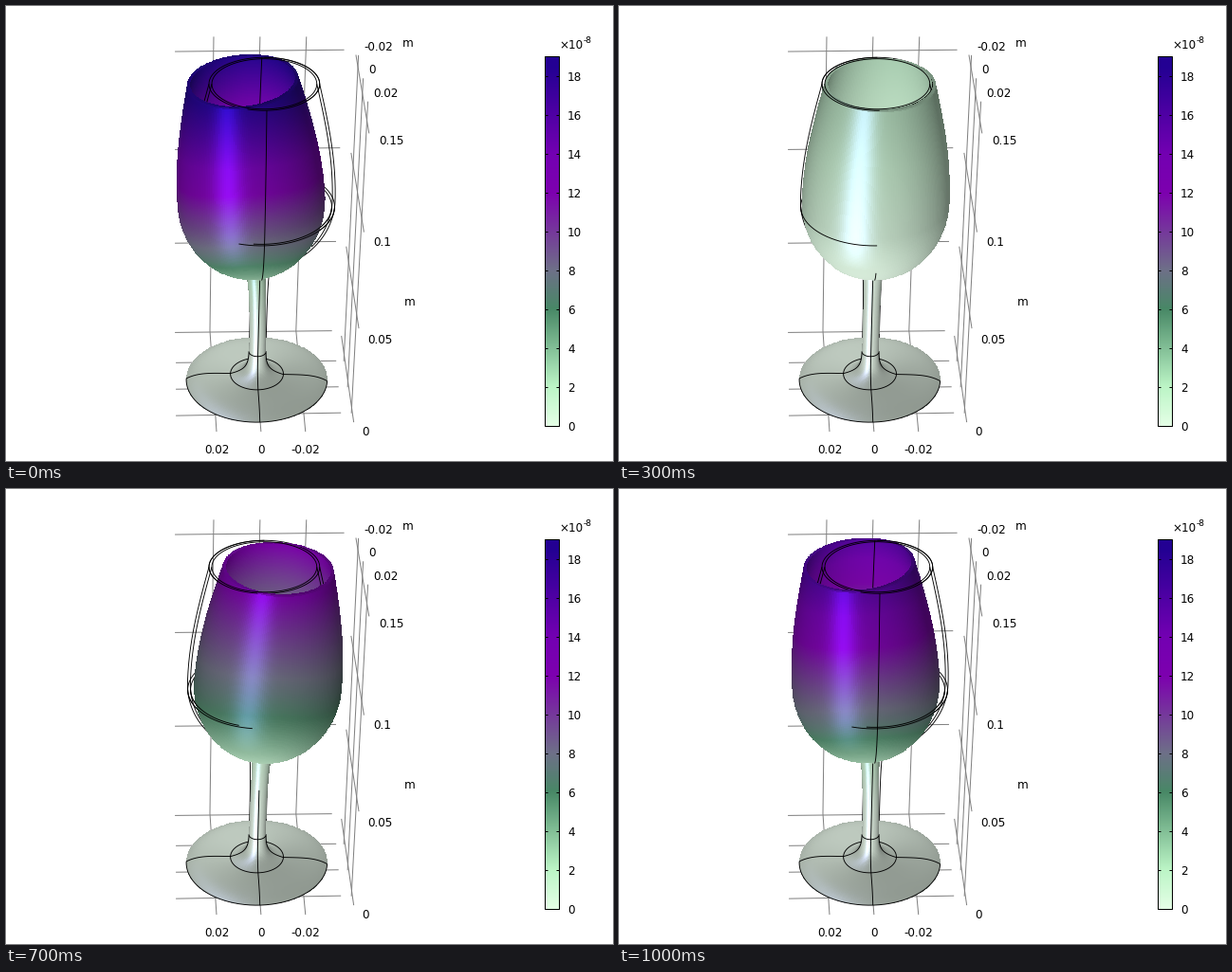
A matplotlib script that plays this animation: 640x480 px, repeating every 1.1 s.

```python
import numpy as np
import matplotlib.pyplot as plt
from matplotlib.animation import FuncAnimation
from matplotlib.patches import Rectangle

W, H, DPI = 640, 480, 100
FRAMES = 11
PX = 72 / DPI
# ring-centre heights on screen, from the lip down to the foot
RIM, WIDE, SEAM, BOTTOM, CLAMP, PLATE = 82, 205, 212, 278, 365, 388.8
WALL = 3
TURN = 0.045          # the front meridian is turned slightly to the right
SIDE = np.pi / 2

STOPS = [0, 2, 6, 8, 12, 14, 18.5]
COLORS = np.array([(228, 255, 230), (188, 245, 198), (72, 136, 102), (110, 112, 136),
                   (125, 0, 175), (115, 0, 178), (35, 0, 147)])


def colormap(v):
    return np.stack([np.interp(v, STOPS, channel) for channel in COLORS.T], -1)


# ---------- geometry ----------
def axis_x(y):
    return 272.5 - 8 * (y - RIM) / 313


def tilt_ratio(y):
    return 0.48 + 0.124 * (y - RIM) / 313


def bowl_radius(y):
    upper = 58.5 + 19.5 * np.sin(SIDE * np.clip((y - RIM) / (WIDE - RIM), 0, 1))
    lower = 78 * np.sqrt(np.clip(1 - ((y - WIDE) / 73) ** 2, 0, 1))
    return np.where(y < WIDE, upper, lower)


def stem_radius(y):
    return 8.8 + 19.2 * np.exp((y - PLATE) / 5) + 2 * np.exp((BOTTOM - y) / 15)


PLATE_R = np.linspace(74.5, 28, 40)
PLATE_Y = PLATE + 6.2 * ((PLATE_R - 28) / 46.5) ** 4
STEM_Y = PLATE - (PLATE - BOTTOM) * np.linspace(0, 1, 70) ** 2
FOOT_Y = np.r_[PLATE_Y, STEM_Y[1:]]
FOOT_R = np.r_[PLATE_R, stem_radius(STEM_Y[1:])]
BOWL_Y = np.r_[WIDE + 73 * np.sin(np.linspace(1.42, 0, 60)), np.linspace(WIDE, RIM, 90)[1:]]
OUT_Y = np.r_[FOOT_Y, BOWL_Y, RIM]
OUT_R = np.r_[FOOT_R, bowl_radius(BOWL_Y), 58.5 - WALL]
IN_Y = np.linspace(RIM, 225, 90)
IN_R = bowl_radius(IN_Y) - WALL
THETA = np.linspace(-np.pi, np.pi, 221)


def place(y, r, theta):
    return axis_x(y) + r * np.sin(theta), y + r * tilt_ratio(y) * np.cos(theta)


def sway(y):
    """Displacement in 1e-8 m and its slope: a stiff bowl on a bending stem."""
    u = np.clip((CLAMP - y) / (CLAMP - BOTTOM), 0, 1)
    bowl = y < BOTTOM
    return np.where(bowl, 18.5 - 0.08 * (y - RIM), 2.86 * u ** 2), np.where(bowl, 0.08, 0.066 * u)


def shade(rgb, y, r, gloss):
    dr, dz = np.gradient(r), -np.gradient(y) / 0.85
    size = np.hypot(dr, dz) + 1e-9
    nr, nz = (dz / size)[:, None], (-dr / size)[:, None]
    nx, ny = nr * np.sin(THETA), nr * np.cos(THETA)
    flat = np.clip(nz, 0, 1) ** 2
    light = 0.48 + 0.4 * np.clip(0.96 * ny - 0.28 * nx, 0, 1) + 0.25 * np.clip(-nz, 0, 1)
    light = light * (1 - flat) + flat * (0.7 - 0.08 * np.cos(THETA) - 0.05 * np.sin(THETA))
    streak = gloss * np.exp(-((nx + 0.28) / 0.2) ** 2) * np.clip(ny, 0, 1)
    streak = (streak * np.clip(1 + 2 * nz, 0, 1))[..., None]
    # pale tones turn greyer under the lamps
    grey = 0.5 * rgb.min(-1, keepdims=True) / 255
    rgb = rgb + grey * (rgb.mean(-1, keepdims=True) - rgb)
    return rgb * (light[..., None] + 0.22 * streak) + 5 + streak * np.array([10, 8, 50])


def surface(y, r, c, z, gloss):
    yy, rr = y[:, None], r[:, None]
    x, sy = place(yy, rr, THETA)
    off = rr * np.sin(THETA)
    v, slope = sway(yy)
    x = x + c * 1.24 * v
    sy = sy + c * (0.16 * v + 0.9 * slope * off)
    rgb = shade(colormap(abs(c) * np.hypot(v, 0.85 * slope * off)), y, r, gloss)
    rgb = (rgb[:-1, :-1] + rgb[1:, 1:]) / 2

    # keep only quads that face the viewer
    ux, uy = x[1:, 1:] - x[:-1, :-1], sy[1:, 1:] - sy[:-1, :-1]
    wx, wy = x[:-1, 1:] - x[1:, :-1], sy[:-1, 1:] - sy[1:, :-1]
    rgba = np.dstack([np.clip(rgb / 255, 0, 1), ux * wy > uy * wx])
    return ax.pcolormesh(x, sy, rgba, shading="flat", antialiased=False, zorder=z)


# ---------- drawing helpers ----------
fig = plt.figure(figsize=(W / DPI, H / DPI), dpi=DPI, facecolor="white")
ax = fig.add_axes([0, 0, 1, 1])
ax.axis("off")


def line(x, y, z, color="black", w=0.9):
    return ax.plot(x, y, color=color, lw=w * PX, zorder=z, solid_capstyle="butt")[0]


def ring(y, r, z, a=-np.pi, b=np.pi):
    return line(*place(y, r, np.linspace(a, b, 160)), z)


def meridian(theta, y, r, z, keep=slice(None)):
    return line(*place(y[keep], r[keep], theta), z)


def text(x, y, s, size=12, ha="left"):
    ax.text(x, y, s, fontsize=size * PX, family="DejaVu Sans", ha=ha,
            va="center_baseline", zorder=9)


def grid(*points):
    line(*zip(*points), 1, "#808080", 1)


# ---------- fixed scene ----------
def draw_axes():
    for k in range(4):                       # heights 0 to 0.15
        y = 345 - 92.2 * k - 2.3 * k * k
        grid((178, y), (344 + 4.3 * k, y - 1.8))
        grid((354 + 5.1 * k, y + 3.5), (367 + 5.4 * k, 440 - 98 * k - 1.3 * k * k))
        text(376 + 5.8 * k, 449 - 95.4 * k - 2.4 * k * k, f"{0.05 * k:g}")
    for j in (-1, 0, 1):                     # the two horizontal axes
        grid((179, 405 + 28 * j), (351 + 2.5 * j, 402.5 + 27.5 * j))
        grid((377 + 5 * j, 76 + 24.5 * j), (360.5 + 4 * j, 403 + 27.5 * j))
        grid((268 + 49 * j, 32), (260.5 + 45.5 * j, 343), (269 + 47 * j, 450))
        text(383 + 5 * j, 66 + 24.5 * j, f"{0.02 * j:g}")
        text(269 + 47 * j, 468, f"{-0.02 * j:g}" if j else "0", ha="center")
    text(418, 38, "m")
    text(420.5, 311, "m")


def draw_colorbar(x0=569, x1=584, top=53, bottom=444, vmax=19):
    ramp = colormap(np.linspace(vmax, 0, bottom - top))[:, None] / 255
    ax.imshow(ramp, extent=(x0, x1, bottom, top), aspect="auto", zorder=2)
    ax.add_patch(Rectangle((x0, top), x1 - x0, bottom - top, fill=False, lw=PX, zorder=4))
    for v in range(0, vmax, 2):
        y = bottom - v * (bottom - top) / vmax
        for x in (x0, x1 - 3):
            line([x, x + 3], [y, y], 4, w=1)
        text(x1 + 9, y, str(v))
    text(x1, top - 13, "×10")
    text(x1 + 25.5, top - 17.5, "-8", 9)


def draw_foot_lines():
    ring(395, 74.5, 6, -SIDE - 0.03, SIDE - 0.03)
    ring(PLATE, 28, 6, -2.8, 2.8)
    ring(CLAMP, 9.2, 6, -SIDE, SIDE)
    for theta in (-SIDE - 0.03, TURN, SIDE - 0.03):
        meridian(theta, FOOT_Y, FOOT_R, 6, FOOT_Y > CLAMP)


# ---------- edges of the undeformed glass ----------
def wires(c):
    bowl_r = bowl_radius(BOWL_Y)
    stem = (FOOT_Y < 367) & (FOOT_Y > 279)
    lean = abs(c) > 0.5

    # behind the moving wall, seen where it has moved away
    for theta in (-SIDE, SIDE):
        yield meridian(theta, BOWL_Y, bowl_r, 4)
        yield meridian(theta, BOWL_Y, bowl_r - WALL, 4, BOWL_Y < 255)
        yield meridian(theta, FOOT_Y, FOOT_R, 4, stem)
    for inset in (0, WALL):
        yield ring(SEAM, 77.6 - inset, 4)
    yield ring(RIM, 58.5, 4)

    # in front of the moving wall, on the trailing side
    a, b = (-0.31, SIDE) if c < 0 else (-SIDE, -0.12 if lean else 0.04)
    yield ring(SEAM, 77.6, 6, a, b)
    if lean:
        yield ring(SEAM, 77.6 - WALL, 6, a + 0.2 * (c < 0), b - 0.2 * (c > 0))
    yield ring(RIM, 58.5, 6, *((a, np.pi) if c < 0 else (-np.pi, b)))
    yield ring(RIM, 58.5 - WALL, 6)
    start = 312 if c > 0 and lean else 284
    yield meridian(TURN, FOOT_Y, FOOT_R, 6, stem & (FOOT_Y > start))
    if c < 0:
        yield meridian(TURN, BOWL_Y, bowl_r, 6, BOWL_Y < 268)
        yield meridian(np.pi + TURN, BOWL_Y, bowl_r, 4, BOWL_Y < 150)
    elif not lean:
        yield meridian(TURN, BOWL_Y, bowl_r, 6, (BOWL_Y > 247) & (BOWL_Y < 268))


draw_axes()
draw_colorbar()
draw_foot_lines()
ax.set_xlim(-0.5, W + 1)
ax.set_ylim(H + 1, -0.5)
moving = []


def update(i):
    while moving:
        moving.pop().remove()
    c = -np.cos(2 * np.pi * i / FRAMES)
    moving.append(surface(IN_Y, IN_R, c, 3, 0))
    moving.append(surface(OUT_Y, OUT_R, c, 5, 1))
    moving.extend(wires(c))
    return moving


anim = FuncAnimation(fig, update, frames=FRAMES, init_func=lambda: [],
                     interval=100, repeat=True, repeat_delay=0, blit=False)
plt.show()
```
